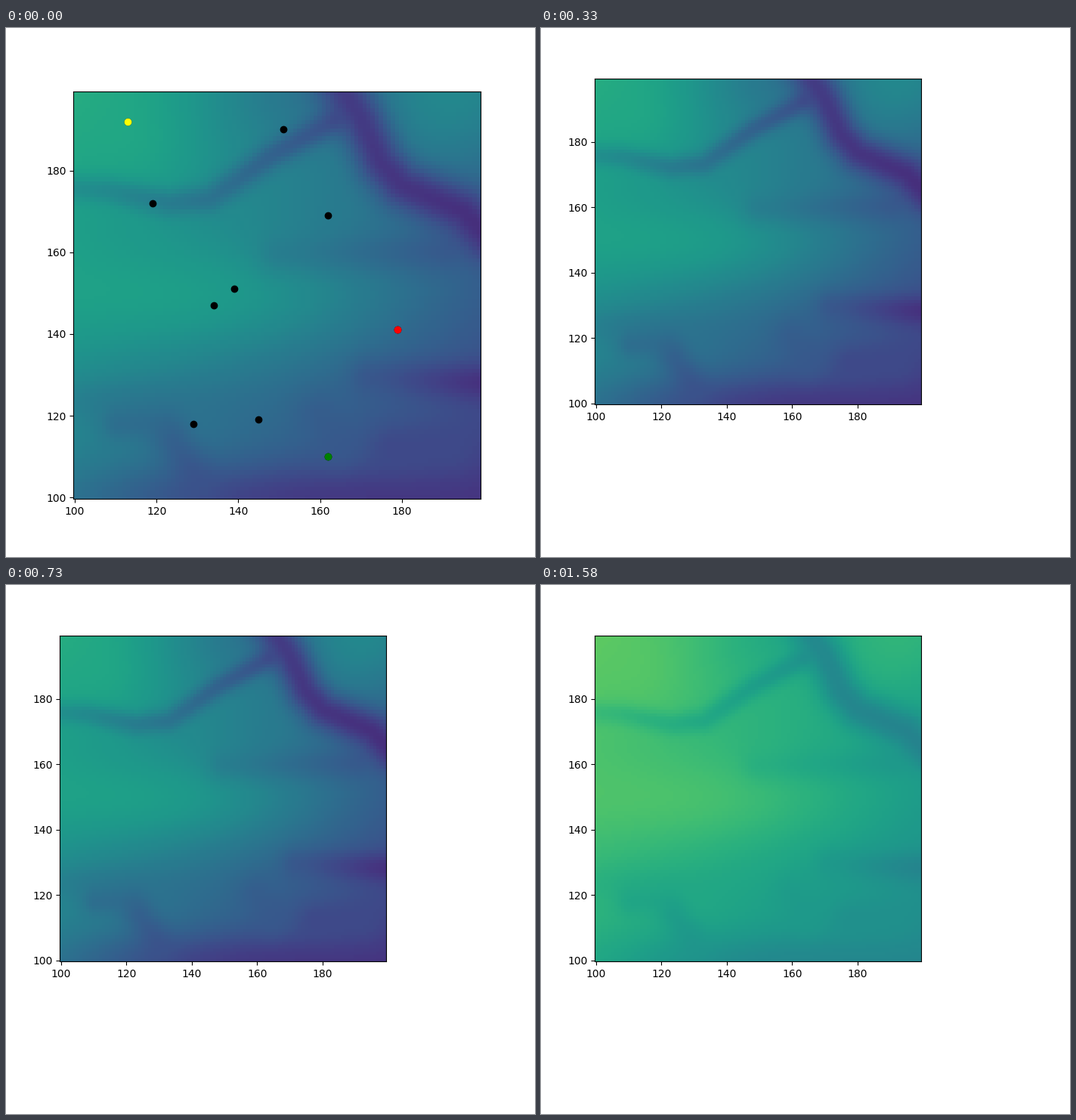
A matplotlib script for the animation above (1980 ms loop, 700 by 700 pixels).

```python
import matplotlib.pyplot as plt
import numpy as np
from matplotlib.animation import FuncAnimation

STAGE, CELLS = 700, 100
LOW, HIGH = 99.665, 199.335

STOPS = [(113, 192), (151, 190), (119, 172), (162, 169), (139, 151),
         (134, 147), (179, 141), (129, 118), (145, 119), (162, 110)]
SPECIAL = {0: "yellow", 6: "red", 9: "green"}

x, y = np.meshgrid(*[np.linspace(LOW + 0.5, HIGH - 0.5, CELLS)] * 2)


def hill(height, cx, cy, wide, tall):
    return height * np.exp(-((x - cx) / wide)**2 / 2 - ((y - cy) / tall)**2 / 2)


def carve(land, points, start, end, width):
    """Pull the land to a height going from start to end along a line."""
    px, py = np.array(points, float).T
    run = np.concatenate([[0], np.cumsum(np.hypot(np.diff(px), np.diff(py)))])
    t = np.linspace(0, run[-1], 120)
    d2 = ((x[..., None] - np.interp(t, run, px))**2
          + (y[..., None] - np.interp(t, run, py))**2)
    near = d2.min(axis=-1)
    pull = np.exp((near[..., None] - d2) / 12)
    level = start + (end - start) * (pull @ t) / pull.sum(axis=-1) / run[-1]
    return land + (level - land) * np.exp(-near / (2 * width**2))


def make_land():
    # A slope rising to the north-west, with a few broad hills and dips
    land = 0.40 - 0.0024 * (x - 150) + 0.0020 * (y - 150)
    land += hill(0.11, 138, 148, 32, 10)
    land += hill(0.035, 118, 185, 10, 10)
    land += hill(0.08, 195, 197, 14, 11)
    land += hill(-0.10, 155, 201, 17, 11)
    land += hill(-0.12, 145, 100, 32, 6)
    land += hill(-0.04, 108, 124, 18, 4)

    # Hollows
    land = carve(land, [(150, 160), (190, 160)], 0.43, 0.28, 3.6)
    land = carve(land, [(172, 129), (200, 128)], 0.28, 0.13, 3.3)
    land = carve(land, [(111, 118), (122, 118)], 0.36, 0.35, 3.2)
    land = carve(land, [(124, 114), (130, 104)], 0.32, 0.24, 3.5)
    land = carve(land, [(160, 120), (165, 113)], 0.30, 0.27, 4)
    land = carve(land, [(178, 112), (192, 112)], 0.22, 0.22, 4)

    # Brook and river
    land = carve(land, [(100, 175.5), (108, 175), (123, 172), (133, 173),
                        (139, 177), (148, 183.5), (163, 192)],
                 0.50, 0.25, 2.4)
    return carve(land, [(164, 202), (170, 193), (175, 182), (180, 176.5),
                        (188, 173), (195, 170), (201, 164)],
                 0.18, 0.13, 4.2)


def box(scale):
    """Axes rectangle for a plot shrunk towards the top left corner."""
    left, top, size = 89.25 * scale, 84 * scale, 539 * scale
    return [left / STAGE, 1 - (top + size) / STAGE, size / STAGE, size / STAGE]


land = make_land()
raised = 0.45 + 0.63 * (land - 0.14)

fig = plt.figure(figsize=(7, 7), dpi=100, facecolor="white")
ax = fig.add_axes(box(1))
image = ax.imshow(land, cmap="viridis", vmin=0, vmax=1, origin="lower",
                  extent=(LOW, HIGH, LOW, HIGH), aspect="auto")
ax.set_xticks(range(100, 200, 20))
ax.set_yticks(range(100, 200, 20))
ax.set(xlim=(LOW, HIGH), ylim=(LOW, HIGH))

dots = ax.plot(*zip(*STOPS), "o", color="black")
for i, color in SPECIAL.items():
    dots += ax.plot(*STOPS[i], "o", color=color)


def draw(i):
    first = i == 0
    ax.set_position(box(1 if first else 0.8))
    image.set_data(land if i < 3 else raised)
    for dot in dots:
        dot.set_visible(first)
    return [image, *dots]


anim = FuncAnimation(fig, draw, frames=6, interval=330, repeat=True,
                     repeat_delay=0, blit=False)
plt.show()
```
